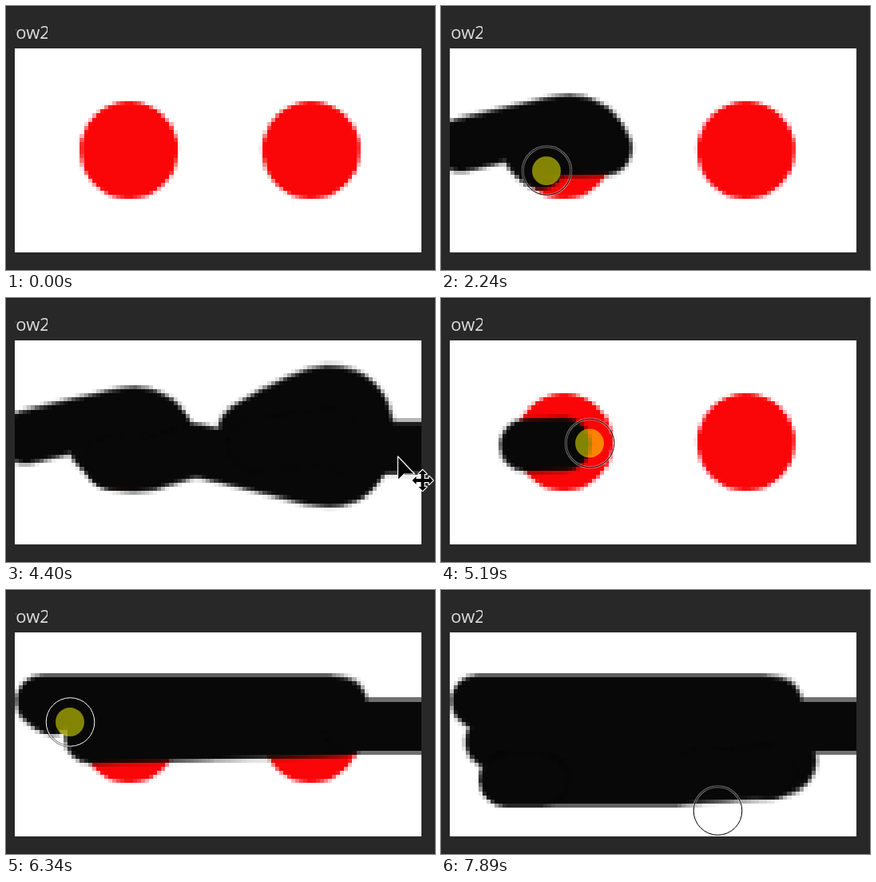
An HTML page with a canvas for the animation above (8000 ms loop, 537x330 px).

```html
<!DOCTYPE html>
<html lang="en">
<head>
<meta charset="utf-8">
<title>Brush strokes</title>
<style>
  html, body { margin: 0; width: 100%; height: 100%; overflow: hidden; background: #282828; }
  #stage { position: relative; width: 537px; height: 330px; overflow: hidden; background: #282828; box-shadow: inset 0 1px #1c1c1c; }
  #label { position: absolute; left: 12px; top: 19px; width: 40px; height: 28px; overflow: hidden; }
  #label span { position: absolute; left: -8.2px; top: 0; font: 22px/27px "Open Sans", "Noto Sans", sans-serif; color: #dcdcdc; }
  canvas { position: absolute; left: 0; top: 0; }
</style>
</head>
<body>
<div id="stage">
  <div id="label"><span>row2</span></div>
  <canvas id="view" width="537" height="330"></canvas>
</div>
<script>
const LOOP = 8000, STEP = 77.3;
const ZOOM = 5.09, LEFT = 11, TOP = 53;
const WIPE = 62, ARROW = 57;      // steps at which the page clears and the arrow shows
const LAG = 0.4;                  // ink trails the pointer

const view = document.getElementById('view').getContext('2d');
const art = document.createElement('canvas');
art.width = 100;
art.height = 50;
const ink = art.getContext('2d');

const linear = u => u;
const easeOut = u => 1 - (1 - u) ** 3;

function move(from, to, d, { paint = false, light = false, ease = linear } = {}) {
  const path = document.createElementNS('http://www.w3.org/2000/svg', 'path');
  path.setAttribute('d', d);
  const length = path.getTotalLength();
  const reach = step => length * ease(Math.max(0, Math.min(1, (step - from) / (to - from))));
  return { from, to, paint, light, reach, line: new Path2D(d),
    at: step => path.getPointAtLength(reach(step)) };
}

const moves = [
  move(1, 6, 'M358 252Q150 190 76 190'),
  move(8, 18, 'M90 190A66 48 0 1 1 98 217L25 175'),
  // two lobes, then out to the right
  move(19, 29, 'M25 174L140 147Q188 135 206 178L110 181L132 206', { paint: true }),
  move(29, 39, 'M132 206Q165 216 200 201L238 190L386 226Q452 238 453 165Q448 117 402 117Q375 118 298 165L311 183', { paint: true }),
  move(39, 51, 'M311 183L410 172L425 187H530L564 195', { paint: true, ease: easeOut }),
  move(54, 56, 'M530 205L492 198', { ease: easeOut }),
  // one bar
  move(62, 65, 'M485 279Q300 260 107 184'),
  move(66, 70, 'M107 184L423 174', { paint: true }),
  move(71, 73, 'M460 172L526 170'),
  // rows from the top down
  move(74, 88.6, 'M526 170H430L418 141L400 139H46L80 165L64 190L85 193H425Q455 222 411 228', { paint: true, light: true }),
  move(88.6, 93, 'M411 228L326 233L290 237H82', { paint: true, light: true, ease: easeOut }),
  move(94, 96, 'M82 237H125', { paint: true, light: true }),
  move(102, 103, 'M346 276h.1')
];

function disc(ctx, x, y, r, fill) {
  ctx.fillStyle = fill;
  ctx.beginPath();
  ctx.arc(x, y, r, 0, 2 * Math.PI);
  ctx.fill();
}

function drawArt(step) {
  ink.setTransform(1, 0, 0, 1, 0, 0);
  ink.fillStyle = '#fff';
  ink.fillRect(0, 0, 100, 50);
  ink.scale(1 / ZOOM, 1 / ZOOM);
  ink.translate(-LEFT, -TOP);
  for (const x of [154, 382]) disc(ink, x, 180, 61, '#fb0608');

  const start = step < WIPE ? 0 : WIPE;
  ink.lineCap = ink.lineJoin = 'round';
  for (const m of moves) {
    if (!m.paint || m.from < start || step - LAG < m.from) continue;
    ink.setLineDash([m.reach(step - LAG), 9999]);
    // soft edge from stacked widths
    for (const [width, alpha] of [[71, 0.25], [67, 0.5], [63, 1]]) {
      ink.lineWidth = width;
      ink.strokeStyle = `rgba(8,8,8,${alpha})`;
      ink.stroke(m.line);
    }
  }
}

function brush({ x, y }, pressed, light) {
  if (pressed) disc(view, x, y, 18, 'rgba(255,255,0,.5)');
  const core = light ? '#fff' : '#000';
  const rim = light ? 'rgba(0,0,0,.4)' : 'rgba(255,255,255,.4)';
  view.beginPath();
  view.arc(x + 0.5, y, 30.3, 0, 2 * Math.PI);
  for (const [width, color] of [[3, rim], [1, core]]) {
    view.lineWidth = width;
    view.strokeStyle = color;
    view.stroke();
  }
}

function moveTool(x, y) {
  const arrow = new Path2D('M0 0V30L8 22H21Z');
  const cross = new Path2D();
  for (let i = 0; i < 4; i++) {
    cross.addPath(new Path2D('M-2 0V-8H-5L0 -13L5 -8H2V0Z'), new DOMMatrix().rotate(90 * i));
  }
  view.save();
  view.translate(x, y);
  view.lineJoin = 'round';
  view.strokeStyle = '#fff';
  view.fillStyle = '#000';
  view.lineWidth = 1.2;
  view.fill(arrow);
  view.stroke(arrow);
  view.translate(31, 30);
  view.lineWidth = 2.4;
  view.stroke(cross);
  view.fill(cross);
  view.restore();
}

function draw(time) {
  const step = Math.floor((time % LOOP + 20) / STEP);
  drawArt(step);
  view.clearRect(0, 0, 537, 330);
  view.imageSmoothingEnabled = false;
  view.drawImage(art, LEFT, TOP, 100 * ZOOM, 50 * ZOOM);

  if (step >= ARROW && step < WIPE) {
    moveTool(490.5, 198);
    return;
  }
  const now = moves.filter(m => m.from <= step).pop();
  if (now && step < now.to + 1.5) brush(now.at(step), now.paint, now.light);
}

function tick() {
  draw(performance.now());
  requestAnimationFrame(tick);
}
tick();
</script>
</body>
</html>
```
